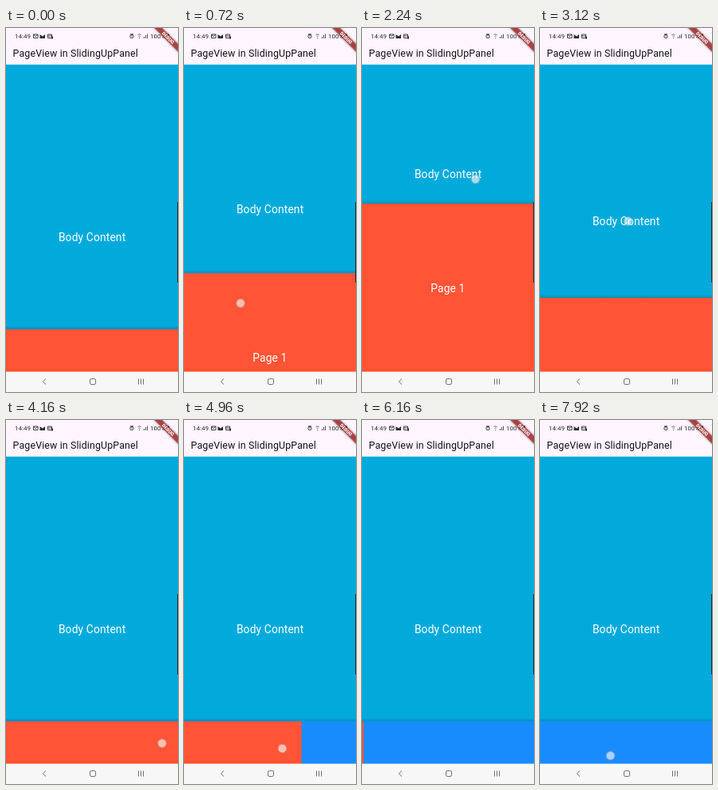
These frames come from a looping animation (216x456 px, 8000 ms). An HTML page:

```html
<!DOCTYPE html>
<html lang="en">
<head>
<meta charset="utf-8">
<title>PageView in SlidingUpPanel</title>
<style>
html, body { margin: 0; width: 100%; height: 100%; overflow: hidden; background: #fef5fe; }
svg { display: block; width: 216px; height: 456px; font-family: Roboto, sans-serif; }
.label { font-size: 13.8px; letter-spacing: .15px; fill: #fff; text-anchor: middle; }
.status { font-size: 8px; fill: #2e2b30; }
.ribbon { filter: drop-shadow(0 0 1.5px rgba(0, 0, 0, .75)); }
</style>
</head>
<body>
<svg viewBox="0 0 216 456">
  <defs>
    <linearGradient id="shade" x1="0" y1="0" x2="0" y2="1">
      <stop offset="0" stop-opacity="0"/>
      <stop offset="1" stop-opacity=".17"/>
    </linearGradient>
    <radialGradient id="dot">
      <stop offset="0" stop-color="#fff" stop-opacity=".62"/>
      <stop offset=".7" stop-color="#fff" stop-opacity=".62"/>
      <stop offset=".82" stop-color="#bbb" stop-opacity=".55"/>
      <stop offset="1" stop-color="#aaa" stop-opacity=".25"/>
    </radialGradient>
  </defs>

  <rect y="45" width="216" height="386" fill="#02aadb"/>
  <text id="body" class="label" x="108.1">Body Content</text>
  <g id="panel">
    <rect y="-4" width="216" height="4" fill="url(#shade)"/>
    <rect width="216" height="220" fill="#198cfd"/>
    <g id="page">
      <rect width="216" height="220" fill="#ff5435"/>
      <text class="label" x="107.900" y="110.800">Page 1</text>
    </g>
  </g>

  <rect width="216" height="45.800" fill="#fef5fe"/>
  <text x="8.600" y="36" font-size="12.400" letter-spacing=".13" fill="#141217">PageView in SlidingUpPanel</text>
  <text class="status" x="11" y="13">14:49</text>
  <g fill="none" stroke="#2e2b30" stroke-width=".9">
    <path d="M34.500 8h5.500v4.500h-5.500zl2.750 2.500 2.750-2.500"/>
    <path d="M52.500 8h5v4.500h-5zM52.500 10h5"/>
    <circle cx="158" cy="10.500" r="2.200"/>
    <path d="M156 7.800h4M158 9.300v1.500"/>
    <path d="M165.500 8.500q2-1.500 4 0M166.500 10.500q1.200-1 2.200 0M167 12.600h1.300" stroke-width=".7"/>
    <path d="M173.500 13v-2M175.500 13v-4M177.500 13V7.500" stroke-width=".8"/>
  </g>
  <path d="M42.500 8l3.500 2.500 3-2.500v5h-6.500zM57 10.500h2v3h-2zM201 7.500h4v6h-4z" fill="#2e2b30"/>
  <text class="status" x="181" y="13">100%</text>

  <g transform="translate(216 0) rotate(45)">
    <rect class="ribbon" x="-30" y="14" width="60" height="7" fill="#b71c1c" fill-opacity=".63"/>
    <text y="19.600" font-size="5.800" font-weight="900" fill="#fff" text-anchor="middle">DEBUG</text>
  </g>

  <rect x="215" y="218" width="3" height="101" rx="1" fill="#20292e"/>
  <rect y="430.600" width="216" height="26" fill="#f7f7f7"/>
  <g fill="none" stroke="#6c6c6c">
    <path d="M50 439.500l-3.700 3.500 3.700 3.500"/>
    <rect x="105.500" y="439.500" width="7" height="7" rx="1.800"/>
    <path d="M166.500 439.500v7M169.500 439.500v7M172.500 439.500v7"/>
  </g>
  <circle id="touch" r="6.200" fill="url(#dot)"/>
</svg>
<script>
const $ = id => document.getElementById(id);
const clamp = (v, lo, hi) => Math.min(hi, Math.max(lo, v));
const OPEN = 220, CLOSED = 377.5, LOOP = 8000, STEP = 80;
const TURN = 2560, LIFT = 5680, SETTLED = 6400;

// Finger strokes as [time, x, y]; the finger lifts after the last point.
const strokes = [
  [[160, 60, 417], [240, 60, 417], [320, 60, 414], [1120, 82, 275.5], [1280, 91, 255],
   [2000, 138, 195], [2240, 142.5, 189.5], [TURN, 132, 124], [2880, 118, 157],
   [3120, 110.5, 242], [3280, 110, 290], [3680, 112, 340]],
  [[4160, 196, 405], [4480, 196, 405], [4960, 123.5, 411.5], [5360, 60, 411], [LIFT, 40, 411]],
  [[6880, 10, 413], [7280, 10, 413], [7920, 88.5, 420.5]]
];

function finger(t) {
  const s = strokes.find(s => t >= s[0][0] && t <= s[s.length - 1][0]);
  if (!s) return null;
  const i = Math.max(1, s.findIndex(p => p[0] >= t));
  const [t0, x0, y0] = s[i - 1], [t1, x1, y1] = s[i];
  const k = (t - t0) / (t1 - t0);
  return { x: x0 + (x1 - x0) * k, y: y0 + (y1 - y0) * k };
}

// Top of the panel: it follows the finger between its two limits.
function panelTop(t, p) {
  if (!p || t > 4000) return CLOSED;
  return clamp(p.y + (t < TURN ? -37.5 : 96), OPEN, CLOSED);
}

// Right edge of the first page: dragged, then settling exponentially.
function pageEdge(t, p) {
  if (t < 4160) return 216;
  if (t <= LIFT) return clamp(p.x + 24, 0, 216);
  return t < SETTLED ? 64 * Math.exp((LIFT - t) / 139) : 0;
}

function draw(now) {
  const time = now % LOOP, t = time - time % STEP;
  const p = finger(t), top = panelTop(t, p);
  $('body').setAttribute('y', 266.7 - (CLOSED - top) / 2);
  $('panel').setAttribute('transform', `translate(0 ${top})`);
  $('page').setAttribute('transform', `translate(${pageEdge(t, p) - 216} 0)`);
  $('touch').style.display = p ? '' : 'none';
  if (p) $('touch').setAttribute('transform', `translate(${p.x} ${p.y})`);
}

let start;
function tick(now) {
  start ??= now;
  draw(now - start);
  requestAnimationFrame(tick);
}
draw(0);
requestAnimationFrame(tick);
</script>
</body>
</html>
```
